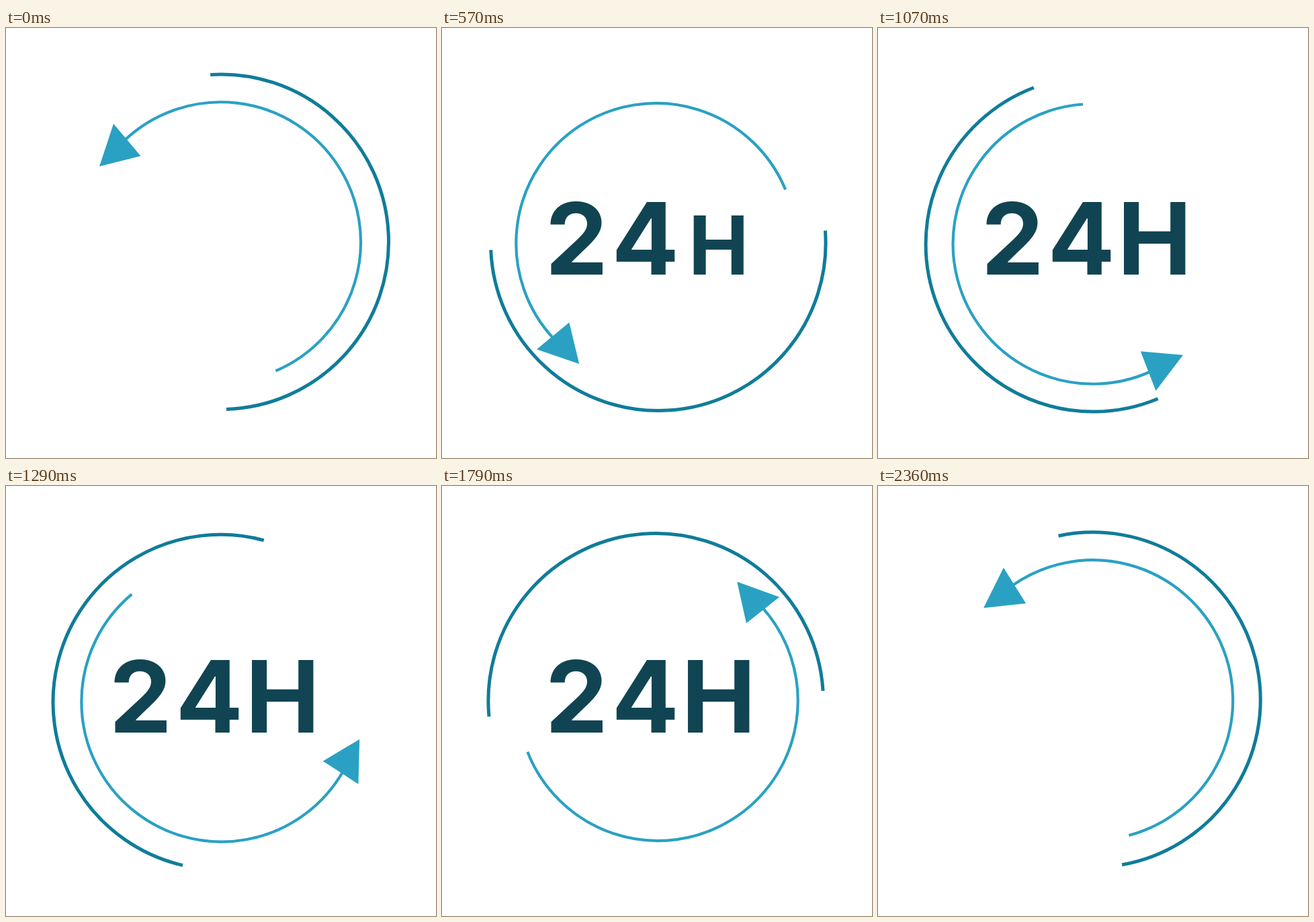
An HTML page that plays this animation: 640x640 px, repeating every 2430 ms.

```html
<!DOCTYPE html>
<html lang="en">
<head>
<meta charset="utf-8">
<title>24H</title>
<style>
  html, body { margin: 0; width: 100%; height: 100%; overflow: hidden; background: #fff; }
  svg { display: block; width: 100%; height: 100%; }
  .ring { fill: none; stroke: #107c9a; stroke-width: 5; }
  .sweep { fill: none; stroke: #2aa1c3; stroke-width: 4.2; }
  .head { fill: #2aa1c3; }
  text { font: 700 148.5px Inter, "Noto Sans", sans-serif; fill: #114452; text-anchor: middle; }
</style>
</head>
<body>
<svg viewBox="0 0 640 640">
  <g id="outer"><path class="ring"/></g>
  <g id="inner">
    <path class="sweep"/>
    <path class="head" d="M160 142.5 139 206 200.5 190.5Z"/>
  </g>
  <g id="label"><text>2</text><text>4</text><text>H</text></g>
</svg>
<script>
const LOOP = 2430, FPS = 14, STEP_FPS = 25;
const DEG_PER_STEP = 5.963;
const BASELINE = 367, CENTERS = [200.3, 302.6, 411.8];
const IN = { start: 0, gap: 5.29, span: 5.45 };
const OUT = { start: 45, gap: 4.6, span: 4.7 };

const find = q => document.querySelector(q);
const clamp = x => Math.min(1, Math.max(0, x));
const outer = find('#outer'), inner = find('#inner');
const letters = [...document.querySelectorAll('#label text')];

// Clockwise arc between two angles in degrees
function arc(cx, cy, r, from, to) {
  const at = a => {
    const rad = a * Math.PI / 180;
    return `${cx + r * Math.cos(rad)} ${cy + r * Math.sin(rad)}`;
  };
  return `M${at(from)}A${r} ${r} 0 ${to - from > 180 ? 1 : 0} 1 ${at(to)}`;
}

// Both circles sit slightly off the pivot, so they wobble as they turn
find('.ring').setAttribute('d', arc(320.2, 318.2, 249.3, -93.7, 88.2));
find('.sweep').setAttribute('d', arc(319.6, 318.7, 208.4, -133.5, 66.9));

const ramp = (step, { start, gap, span }, i) => clamp((step - start - gap * i) / span);

function draw(ms) {
  const tick = Math.floor((Math.floor(ms % LOOP / 10) + 0.5) * FPS / 100);
  const step = Math.ceil(tick * STEP_FPS / FPS);
  const turn = step * DEG_PER_STEP;
  outer.setAttribute('transform', `rotate(${turn} 320 320)`);
  inner.setAttribute('transform', `rotate(${-turn} 320 320)`);
  letters.forEach((el, i) => {
    const size = ramp(step, IN, i) - ramp(step, OUT, 2 - i);
    el.setAttribute('visibility', size > 0 ? 'visible' : 'hidden');
    el.setAttribute('transform', `translate(${CENTERS[i]} ${BASELINE}) scale(${Math.max(size, 0.001)})`);
  });
}

const began = performance.now();
function frame() {
  draw(performance.now() - began);
  requestAnimationFrame(frame);
}
frame();
</script>
</body>
</html>
```
